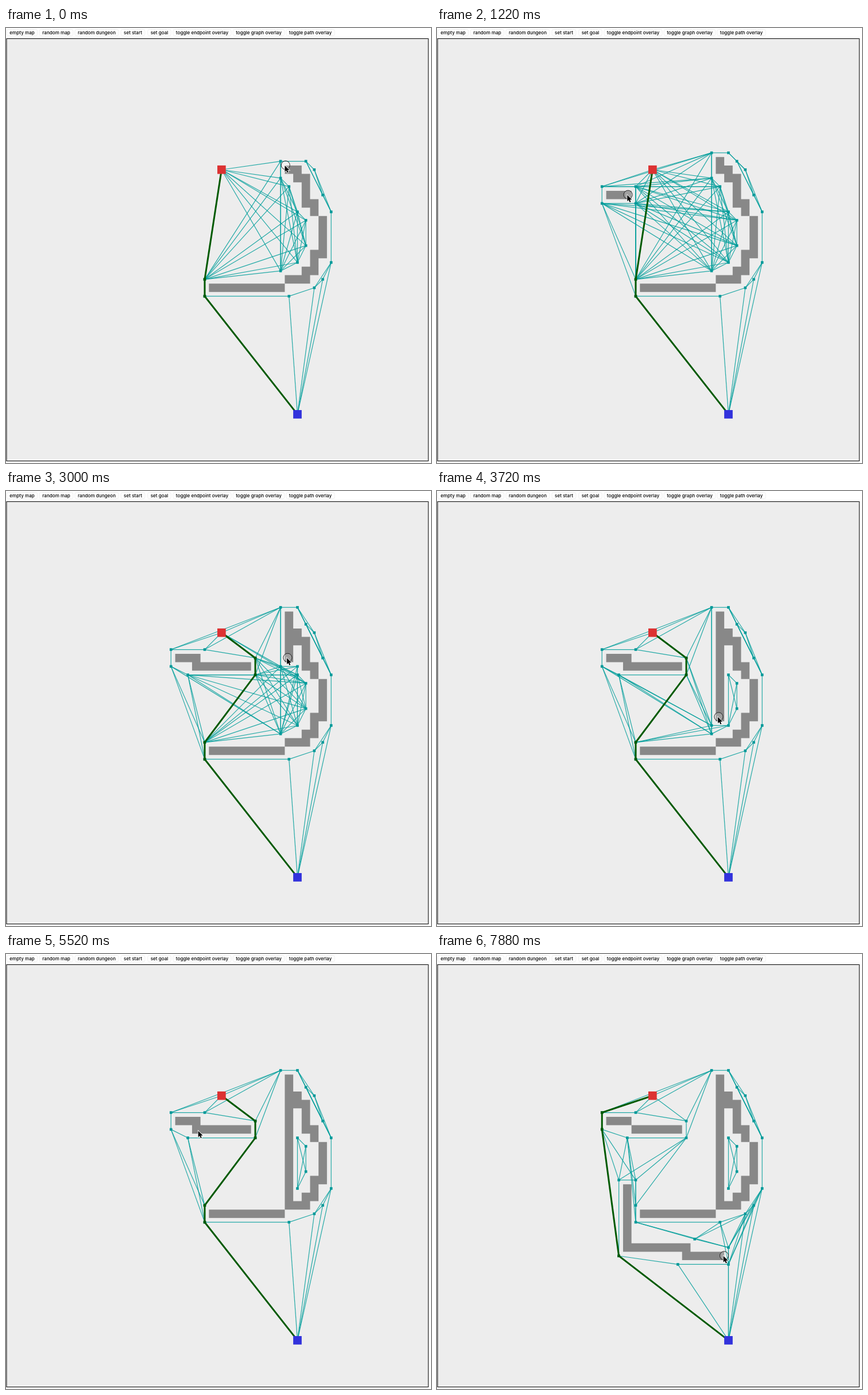
These frames come from a looping animation (740 by 756 pixels, 8 s). An HTML page with a canvas:

```html
<!DOCTYPE html>
<html>
<head>
<meta charset="utf-8">
<style>
html, body { margin: 0; width: 100%; height: 100%; overflow: hidden; background: #fff; }
canvas { display: block; }
</style>
</head>
<body>
<canvas id="stage" width="740" height="756"></canvas>
<script>
const ctx = document.getElementById('stage').getContext('2d');
const LOOP = 8000, STEPS = 54, CELL_X = 14.68, CELL_Y = 14.66;
const px = x => 1 + x * CELL_X, py = y => 19 + y * CELL_Y;
const cx = x => px(x + .5), cy = y => py(y + .5);
const start = { x: 25, y: 15 }, goal = { x: 34, y: 44 };

// Points along a polyline, about one per cell
function trace(points) {
  const out = [points[0]];
  for (let i = 1; i < points.length; i++) {
    const [x0, y0] = points[i - 1], [x1, y1] = points[i];
    const n = Math.ceil(Math.max(Math.abs(x1 - x0), Math.abs(y1 - y0)));
    for (let j = 1; j <= n; j++) out.push([x0 + (x1 - x0) * j / n, y0 + (y1 - y0) * j / n]);
  }
  return out;
}

const firstWall = trace([[24, 29], [32, 29], [33, 28], [35, 28], [35, 27], [36, 27], [36, 25], [37, 25],
  [37, 21], [36, 20], [36, 19], [35, 19], [35, 16], [34, 16], [34, 15], [33, 15]]);

// What the pointer does, in steps of the loop; it glides from one stroke to the next
const strokes = [
  ['draw', 0, 1, [[32.5, 14.5], [32.5, 13.6]]],
  ['move', 5, 5, [[19.5, 18]]],
  ['draw', 7, 11, [[20, 18], [22, 18], [22, 19], [28, 19]]],
  ['draw', 16, 26.5, [[32.75, 13], [32.75, 27]]],
  ['erase', 38, 38, [[22, 19]]],
  ['draw', 45, 46, [[22, 26], [22, 28]]],
  ['draw', 48, 48, [[22, 33], [22, 29]]],
  ['draw', 48.4, 52.8, [[23, 33], [29, 33], [29, 34], [33.4, 34]]],
].map(([kind, from, to, points]) => ({ kind, from, to, cells: trace(points) }));

const buttons = [['empty map', 28], ['random map', 87.5], ['random dungeon', 158], ['set start', 221],
  ['set goal', 267], ['toggle endpoint overlay', 341.5], ['toggle graph overlay', 440],
  ['toggle path overlay', 530]];

const smooth = f => f * f * (3 - 2 * f);

function pointerAt(k) {
  const i = strokes.findLastIndex(s => s.from <= k), s = strokes[i], next = strokes[i + 1];
  const last = s.cells.length - 1;
  if (k <= s.to) {
    const f = s.to > s.from ? (k - s.from) / (s.to - s.from) : 0;
    return s.cells[Math.round(f * last)];
  }
  if (!next) return s.cells[last];
  const f = smooth((k - s.to) / (next.from - s.to)), a = s.cells[last], b = next.cells[0];
  return [a[0] + (b[0] - a[0]) * f, a[1] + (b[1] - a[1]) * f];
}

function wallsAt(k) {
  const walls = new Map();
  const paint = (cell, kind) => {
    const c = cell.map(Math.round);
    if (kind === 'draw') walls.set(c.join(), c);
    if (kind === 'erase') walls.delete(c.join());
  };
  firstWall.forEach(c => paint(c, 'draw'));
  for (const { kind, from, to, cells } of strokes)
    cells.forEach((c, i) => {
      if (k >= from + (to - from) * i / Math.max(1, cells.length - 1) - 1e-6) paint(c, kind);
    });
  return walls;
}

// Free cells that touch a wall only at an outer corner
function findNodes(walls) {
  const nodes = new Map(), blocked = (x, y) => walls.has(x + ',' + y);
  for (const [wx, wy] of walls.values())
    for (const dx of [-1, 1]) for (const dy of [-1, 1]) {
      const x = wx + dx, y = wy + dy;
      if (!blocked(x, y) && !blocked(wx, y) && !blocked(x, wy)) nodes.set(x + ',' + y, { x, y });
    }
  return [...nodes.values()];
}

// Does the segment cross the wall's box with its safety margin?
function hits(a, b, [wx, wy]) {
  let t0 = 0, t1 = 1;
  for (const [p, d, lo, hi] of [[a.x, b.x - a.x, wx - .99, wx + .49], [a.y, b.y - a.y, wy - .99, wy + .99]]) {
    if (!d) {
      if (p <= lo || p >= hi) return false;
      continue;
    }
    const u = (lo - p) / d, v = (hi - p) / d;
    t0 = Math.max(t0, Math.min(u, v));
    t1 = Math.min(t1, Math.max(u, v));
  }
  return t0 < t1;
}

function shortestPath(points, edges) {
  const dist = new Map(points.map(p => [p, Infinity])), from = new Map();
  dist.set(start, 0);
  for (let changed = true; changed;) {
    changed = false;
    for (const [a, b] of edges) for (const [u, v] of [[a, b], [b, a]]) {
      const d = dist.get(u) + Math.hypot(u.x - v.x, u.y - v.y);
      if (d < dist.get(v) - 1e-9) {
        dist.set(v, d);
        from.set(v, u);
        changed = true;
      }
    }
  }
  const path = [goal];
  while (from.has(path[0])) path.unshift(from.get(path[0]));
  return path;
}

const cache = {};
function sceneAt(k) {
  if (cache[k]) return cache[k];
  const map = wallsAt(k), walls = [...map.values()], nodes = findNodes(map);
  const points = [start, goal, ...nodes], edges = [];
  points.forEach((a, i) => {
    for (const b of points.slice(i + 1)) if (!walls.some(w => hits(a, b, w))) edges.push([a, b]);
  });
  return cache[k] = { walls, nodes, edges, path: shortestPath(points, edges) };
}

function drawLines(lines, color, width) {
  ctx.strokeStyle = color;
  ctx.lineWidth = width;
  for (const line of lines) {
    ctx.beginPath();
    for (const p of line) ctx.lineTo(cx(p.x), cy(p.y));
    ctx.stroke();
  }
}

function square(p, size, color) {
  ctx.fillStyle = color;
  ctx.fillRect(cx(p.x) - size / 2, cy(p.y) - size / 2, size, size);
}

function drawPage() {
  ctx.fillStyle = '#fff';
  ctx.fillRect(0, 0, 740, 756);
  ctx.font = '500 8.1px Inter, "Liberation Sans", sans-serif';
  ctx.textAlign = 'center';
  ctx.lineWidth = 1;
  for (const [label, x] of buttons) {
    const w = ctx.measureText(label).width + 10;
    ctx.strokeStyle = '#eee';
    ctx.beginPath();
    ctx.roundRect(x - w / 2, 2.5, w, 11, 3);
    ctx.stroke();
    ctx.fillStyle = '#000';
    ctx.fillText(label, x, 11);
  }
  ctx.fillStyle = '#ededed';
  ctx.fillRect(1, 18.5, 734.3, 734);
  ctx.strokeStyle = '#000';
  ctx.strokeRect(1, 18.5, 734.3, 734);
}

function drawWalls(walls) {
  ctx.fillStyle = '#888';
  ctx.beginPath();
  for (const [x, y] of walls) ctx.rect(px(x), py(y), CELL_X, CELL_Y);
  ctx.fill();
}

function drawPointer(k) {
  const [col, row] = pointerAt(k), x = cx(col), y = cy(row);
  if (strokes.some(s => s.kind !== 'move' && k >= s.from && k <= Math.ceil(s.to))) {
    ctx.beginPath();
    ctx.arc(x + 1.3, y - .5, 7.5, 0, 7);
    ctx.fillStyle = 'rgba(255,255,255,.2)';
    ctx.fill();
    ctx.strokeStyle = '#222';
    ctx.lineWidth = 1;
    ctx.stroke();
  }
  ctx.beginPath();
  for (const [dx, dy] of [[0, 0], [0, 11], [2.5, 8.7], [4.3, 12.7], [6.2, 11.9], [4.5, 8], [8, 8]])
    ctx.lineTo(x + dx, y + dy);
  ctx.closePath();
  ctx.strokeStyle = '#fff';
  ctx.lineWidth = 1.5;
  ctx.stroke();
  ctx.fillStyle = '#000';
  ctx.fill();
}

function draw(now) {
  const k = Math.floor(now % LOOP / LOOP * STEPS), { walls, nodes, edges, path } = sceneAt(k);
  drawPage();
  drawWalls(walls);
  drawLines(edges, 'rgba(0,158,154,.85)', 1.2);
  for (const p of nodes) square(p, 4.6, '#009999');
  drawLines([path], '#005a00', 3);
  for (const p of path) square(p, 4.6, '#005a00');
  square(start, 14.7, '#dc3232');
  square(goal, 14.7, '#3232dc');
  drawPointer(k);
  requestAnimationFrame(draw);
}
requestAnimationFrame(draw);
</script>
</body>
</html>
```
